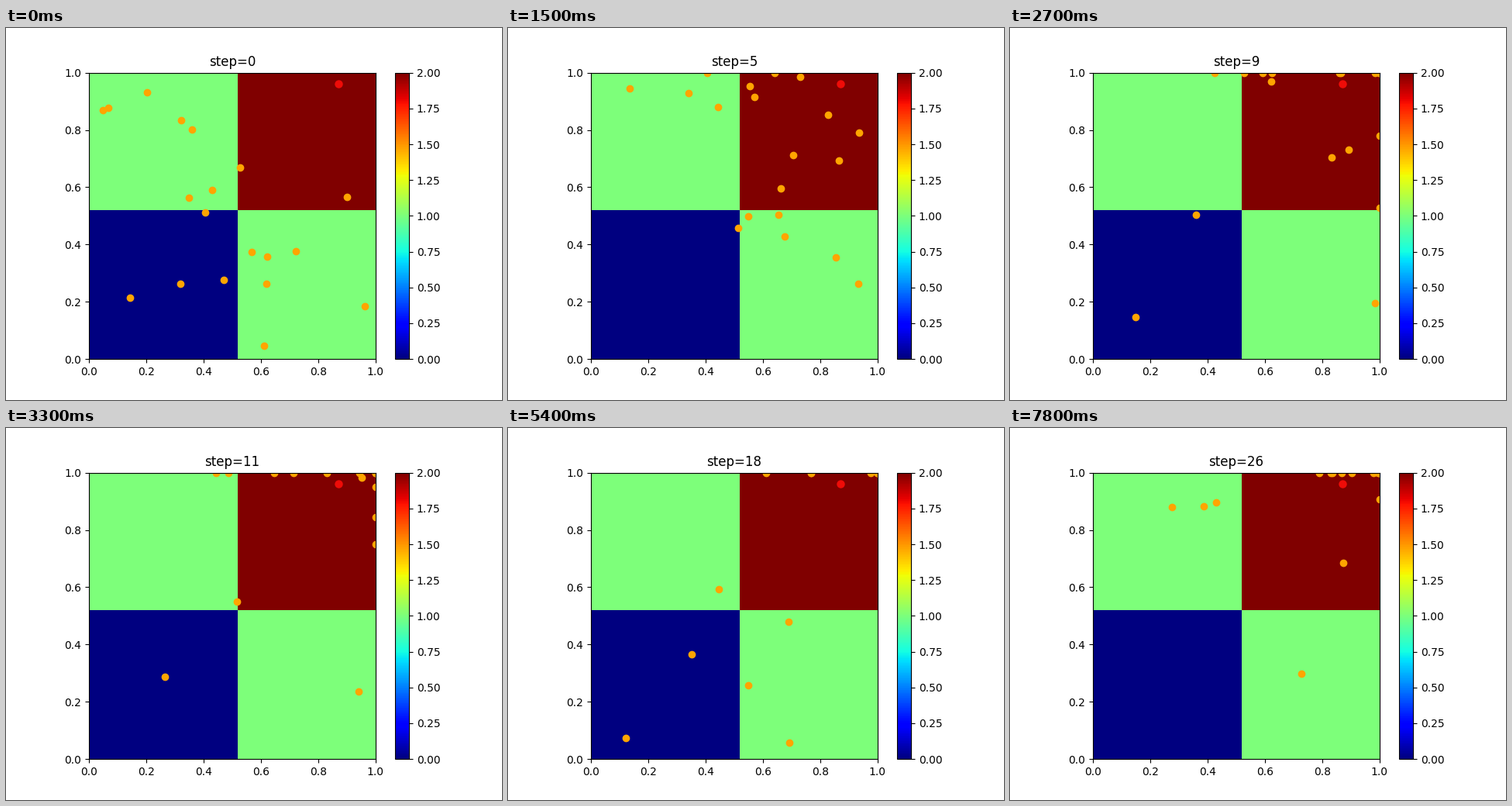
Animation of 640 by 480 pixels, one loop 8000 ms. Source, as a matplotlib script:

```python
import numpy as np
import matplotlib.pyplot as plt
from matplotlib.animation import FuncAnimation

STEPS = 27
TICKS_PER_STEP = 3
BEST = np.array([0.87, 0.96])
PULL = 0.07       # strongest random pull towards the best point
SPEED = 0.04      # spread of a new particle's velocity
RESTART = 0.035   # chance per step that a particle starts afresh

# Initial swarm, as x, y pairs
START = [.047, .869, .068, .877, .203, .931, .322, .834, .360, .802,
         .349, .563, .528, .669, .430, .590, .901, .566, .406, .511,
         .568, .373, .722, .376, .319, .262, .471, .277, .622, .357,
         .619, .262, .612, .046, .963, .184, .144, .214]


def swarm_track():
    """Particles swing towards the best point and are held inside the square."""
    rng = np.random.default_rng(4)
    pos = np.reshape(START, (-1, 2))
    vel = rng.normal(0, SPEED, pos.shape)
    track = [pos]
    for _ in range(STEPS - 1):
        vel = vel + rng.uniform(0, PULL, pos.shape) * (BEST - pos)
        pos = np.clip(pos + vel, 0, 1)
        fresh = rng.random((len(pos), 1)) < RESTART
        pos = np.where(fresh, rng.random(pos.shape), pos)
        vel = np.where(fresh, rng.normal(0, SPEED, pos.shape), vel)
        track.append(pos)
    return track


track = swarm_track()

fig, ax = plt.subplots(figsize=(6.4, 4.8), dpi=100)
edges = [0, 0.52, 1]
mesh = ax.pcolormesh(edges, edges, [[0, 1], [1, 2]], cmap="jet", vmin=0, vmax=2)
ax.set(xlim=(0, 1), ylim=(0, 1), aspect="equal")
fig.colorbar(mesh, ax=ax)
particles = ax.scatter(*track[0].T, c="orange", linewidths=1.0)
ax.scatter(*BEST, c="#ee0c08", linewidths=1.5, zorder=2)
title = ax.set_title("step=0")


def update(frame):
    step = frame // TICKS_PER_STEP
    particles.set_offsets(track[step])
    title.set_text(f"step={step}")
    return particles, title


anim = FuncAnimation(fig, update, frames=STEPS * TICKS_PER_STEP - 1,
                     interval=100, repeat=True)
plt.show()
```
